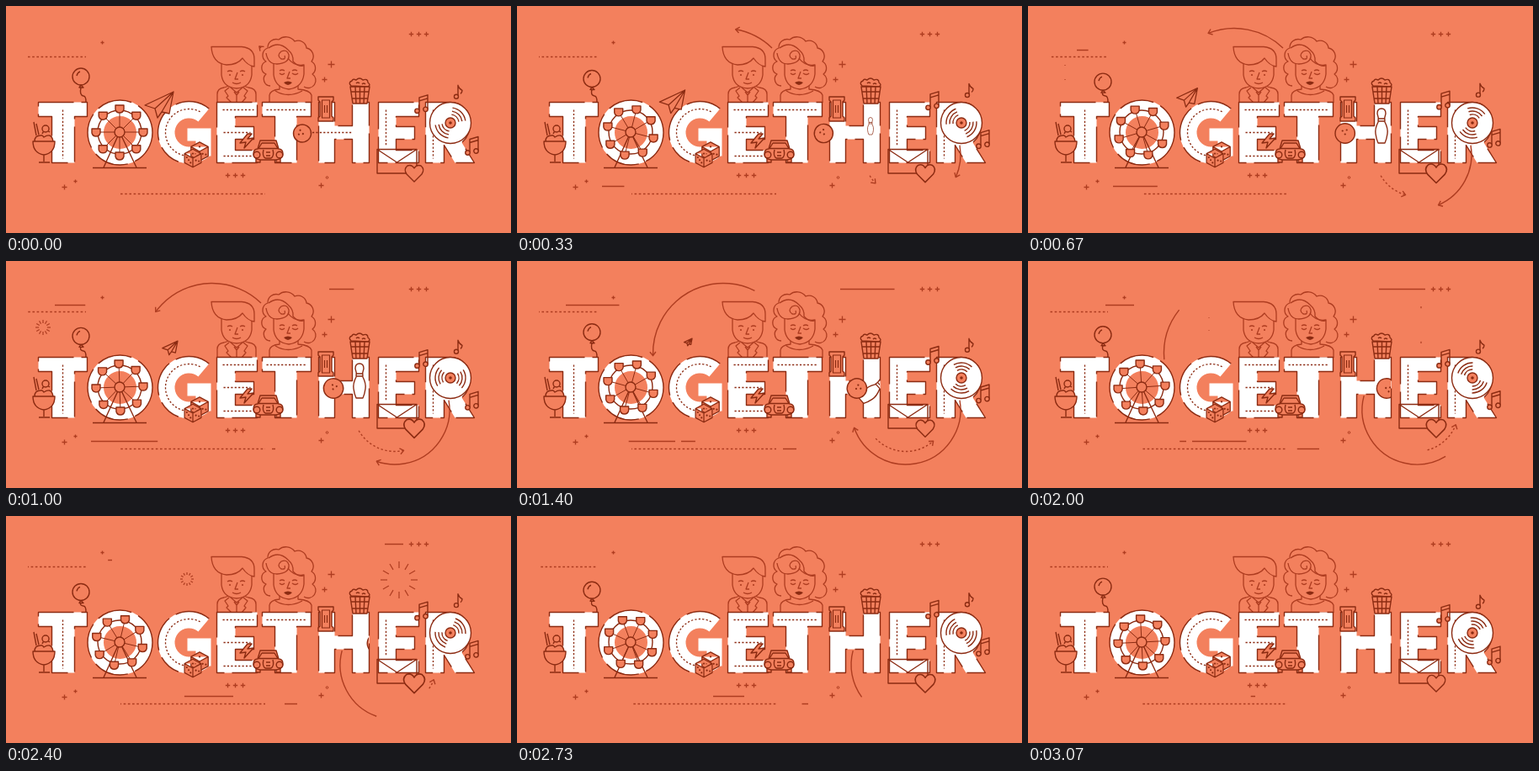
Write an HTML page with a canvas that moves like this. It is 600x270 px and loops after 3.14 s.

```html
<!DOCTYPE html>
<html lang="en">
<head>
<meta charset="utf-8">
<title>Together</title>
<style>
  html, body { margin: 0; width: 100%; height: 100%; overflow: hidden; background: #f3805d; }
  canvas { display: block; width: 600px; height: 270px; }
</style>
</head>
<body>
<canvas id="stage"></canvas>
<script>
const LOOP = 3140, STEPS = 47, TAU = Math.PI * 2, RAD = Math.PI / 180;
const BG = '#f3805d', DARK = '#8c2b12', MID = '#ae3c20', WHITE = '#fff';
const canvas = document.getElementById('stage');
const ctx = canvas.getContext('2d');
const dpr = window.devicePixelRatio || 1;
canvas.width = 600 * dpr;
canvas.height = 270 * dpr;

// Progress 0..1 between two steps, and a straight move over that span.
const progress = (k, from, to) => Math.min(1, Math.max(0, (k - from) / (to - from)));
const move = (k, from, to, a, b) => a + (b - a) * progress(k, from, to);
const easeOut = (p, power) => 1 - (1 - p) ** power;

function paint(path, { fill, line, w = 1.4, dash = [], shift = 0 }) {
  const p = typeof path === 'string' ? new Path2D(path) : path;
  if (fill) { ctx.fillStyle = fill; ctx.fill(p); }
  if (line) {
    ctx.strokeStyle = line;
    ctx.lineWidth = w;
    ctx.setLineDash(dash);
    ctx.lineDashOffset = shift;
    ctx.stroke(p);
  }
}

function arc(x, y, r, from, to, style) {
  const p = new Path2D();
  p.arc(x, y, r, from * RAD, to * RAD, to < from);
  paint(p, style);
}

const disc = (x, y, r, style) => arc(x, y, r, 0, 360, style);

function at(x, y, turn, scale, draw) {
  ctx.save();
  ctx.translate(x, y);
  ctx.rotate(turn * RAD);
  ctx.scale(scale, scale);
  draw();
  ctx.restore();
}

const ink = { line: DARK };
const solid = { line: DARK, fill: BG };
const soft = { line: MID, w: 1.3 };
const softFill = { ...soft, fill: BG };
const dots = { line: DARK, w: 1.3, dash: [2.2, 2.2] };
const edge = { line: DARK, dash: [42, 9] };

const rule = (x0, x1, y) => {
  if (x1 - x0 > 0.5) paint(`M${x0} ${y}H${x1}`, { line: MID, w: 1.5 });
};
const plus = (x, y, r) => paint(`M${x - r} ${y}H${x + r}M${x} ${y - r}V${y + r}`, soft);

function arrow(cx, cy, r, from, to, { dash = [], head = true } = {}) {
  if (Math.abs(to - from) < 1) return;
  arc(cx, cy, r, from, to, { line: MID, dash });
  if (head) at(cx + r * Math.cos(to * RAD), cy + r * Math.sin(to * RAD), to + (to < from ? -90 : 90), 1,
    () => paint('M-4.5 -3.5L0 0L-4.5 3.5', { line: MID }));
}

function burst(x, y, r, k, start) {
  const p = (k - start) / 11;
  if (p <= 0 || p >= 1) return;
  const rays = p < 0.15 ? 2 : 12;
  const inner = r * (rays === 2 ? 0.9 : Math.max(0.5, p));
  for (let i = 0; i < rays; i++)
    at(x, y, 90 + i * 360 / rays, 1, () => paint(`M${inner} 0H${r}`, { line: MID, w: 1.2 }));
}

function face(x, y) {
  paint(`M${x - 11} ${y - 4}q3 -2 6 0m9 0q3 -2 6 0M${x + 1} ${y - 3}l-3 8h4`, soft);
}

function people() {
  // man
  paint('M251 115V105Q251 98 259 97L265 95M297 115V105Q297 98 288 97L282 95M251 115H297', soft);
  paint('M265 97L260 101L264 107L262 109L268 115M282 97L287 101L283 107L285 109L280 115M267 97L274 103L281 97M271 102L274 106L277 102M274 106V115', soft);
  paint('M256 68V82Q258 97 274 98Q290 97 292 82V66', softFill);
  paint('M244 48.5H280Q295 50 295 63V72Q287 71 281 62Q275 70 262 70Q245 68 244 48.5Z', softFill);
  face(274, 82);
  paint('M269 91Q274 94 279 91', soft);
  for (const x of [266, 281]) disc(x, 82, 1.1, { fill: MID });
  // woman
  paint('M314 95A8 8 0 0 1 309 81A8 8 0 0 1 309 66A9 9 0 0 1 311 50A10 10 0 0 1 324 40A13 13 0 0 1 343 42A10 10 0 0 1 357 50A10 10 0 0 1 363 66A9 9 0 0 1 364 81A8 8 0 0 1 354 96', softFill);
  paint('M313 115V106Q314 100 325 99V95M363 115V106Q361 100 347 99V95M313 115H363M320 101Q335 110 352 101', softFill);
  paint('M318 68V82Q320 97 336 99Q352 97 354 81V70Q342 72 335 62', softFill);
  paint('M309 56Q311 69 322 69Q337 68 336 58Q334 51 327 54Q321 59 327 63Q333 64 331 59M312 50Q324 41 335 52Q342 58 341 66Q348 73 354 71', soft);
  face(336, 81);
  paint('M325 80Q328 83 331 80M340 80Q344 83 347 80', soft);
  paint('M330 91Q335 88 340 91Q335 97 330 91Z', { fill: DARK });
}

const LETTERS = [
  'M38 114H96V131H81V186H54V131H38Z',
  'M250 114H298V131H272V143H294V158H272V171H298V186H250Z',
  'M304 114H362V131H345V186H319V131H304Z',
  'M371 114H390V142H411V114H431V186H411V158H390V186H371Z',
  'M442 114H490V131H463V143H485V158H463V171H490V186H442Z',
  'M498 114H526Q550 115 551 138Q551 154 541 162L556 186H533L520 165V186H498Z'
];

function letters() {
  at(0.5, 0.5, 0, 1, () => {
    for (const d of LETTERS) paint(d, { ...edge, fill: WHITE });
    disc(135, 150, 29, { line: WHITE, w: 19 });
    disc(135, 150, 38.5, edge);
    arc(217, 150, 27, -50, -312, { line: WHITE, w: 20 });
    arc(217, 150, 37, -50, -250, edge);
    paint('M215 145H243V178H225V160H215Z', { fill: WHITE });
    paint('M67 123V181M257 123H294M258 150H290M258 178H293M309 123H357M451 123V166M507 123V181', dots);
    arc(217, 150, 28, -62, -258, dots);
  });
}

function wheel(turn) {
  paint('M103 192.5H167M135 150L116 192M135 150L155 192', ink);
  disc(135, 150, 26, ink);
  for (let i = 0; i < 8; i++) {
    const a = (turn + i * 45 - 90) * RAD, c = Math.cos(a), s = Math.sin(a);
    paint(`M135 150L${135 + 27 * c} ${150 + 27 * s}`, { line: DARK, w: 1 });
    at(135 + 28 * c, 150 + 28 * s, 0, 1,
      () => paint('M-5 -4H5V1Q4 5 0 5Q-4 5 -5 1Z', solid));
  }
  disc(135, 150, 6, solid);
}

function cube(x, y, s) {
  at(x, y, 0, s, () => {
    paint('M0 -12L11 -6V6L0 12L-11 6V-6ZM-11 -6L0 0L11 -6M0 0V12', solid);
    for (const [px, py] of [[0, -6], [-8, -1], [-3, 6], [-5.5, 2.5], [4, 3], [8, 4]])
      disc(px, py, 1.2, { fill: DARK });
  });
}

function props(rise) {
  // balloon
  at(89, 85 + rise, 0, 1, () => {
    disc(0, -1, 10, ink);
    paint('M0 9L-2 12H3ZM-5 -2Q-4 -6 -1 -7', ink);
  });
  paint(`M89 ${97 + rise}Q87 106 92 107Q95 107 95 114`, ink);
  // sundae
  paint('M32 161Q32 175 45 177Q58 175 58 161ZM45 177V185M39 186H52M34 161Q34 154 41 154Q43 153 45 156Q54 150 56 161M43 152Q46 145 52 150M36 154L33 138M39 153L36 140', solid);
  disc(47, 146, 4, solid);
  // dice, bolt
  cube(230, 173, 0.93);
  cube(222, 181, 0.9);
  paint('M287 152L278 163L285 162L283 169L294 157L287 158L292 152Z', solid);
  // car
  paint('M297 181V186H302V181ZM321 181V186H326V181Z', solid);
  paint('M294 176Q294 170 299 170L302 160H321L324 170Q329 170 329 176Q329 182 321 183H302Q294 182 294 176Z', solid);
  paint('M300 169.5L304 163H319L323 169.5ZM306 171Q304 178 308 181H315Q319 178 317 171M309 174H314M309 178H314', ink);
  for (const x of [298, 325]) disc(x, 177, 3.8, solid);
  // ticket
  paint('M371 108H389V112L387 114V131L389 133V137H371V133L373 131V114L371 112Z', solid);
  paint('M375.5 112H384.5V133H375.5ZM378.5 118V127M381.5 118V127', { line: DARK, w: 1.2 });
  // popcorn
  paint('M410 95Q406 91 411 89Q412 86 416 88Q420 84 424 88Q430 86 430 91Q434 94 430 96ZM416 92Q418 90 420 92M423 93Q425 91 427 93', solid);
  paint('M409 96H432L429 116H412ZM410 102H431M411 110H430M415 96L416 116M420.5 96V116M426 96L425 116', solid);
}

const PIN = 'M0 -21Q5 -21 5 -15Q3 -10 4 -5Q8 3 7 9Q6 16 4 20H-4Q-6 16 -7 9Q-8 3 -4 -5Q-3 -10 -5 -15Q-5 -21 0 -21ZM-4 -9H4M-4 -6H4';

function bowling(k) {
  const x = 352 + 2.47 * k;
  if (k < 5) paint(`M${x + 12} 150.5H411`, dots);
  ctx.save();
  ctx.beginPath();
  ctx.rect(330, 100, 101, 100);
  ctx.clip();
  if (k < 26) {
    const fall = easeOut(progress(k, 20, 26), 3);
    at(420 + 10 * fall, 143 + 24 * fall, 115 * fall, progress(k, 3, 7), () => paint(PIN, { ...ink, fill: WHITE }));
  }
  at(x, 151.5, (k - 10) * 6, 1, () => {
    disc(0, 0, move(k, 0, 10, 10.5, 11.7), solid);
    for (const [px, py] of [[-3, -3], [2, -4], [0, 1]]) disc(px, py, 1.1, { fill: DARK });
  });
  ctx.restore();
}

function record(turn) {
  disc(528, 139, 24.5, { ...ink, fill: WHITE });
  at(528, 139, turn, 1, () => {
    for (const r of [10, 14, 18]) for (const a of [0, 180]) arc(0, 0, r, a - 37, a + 37, ink);
  });
  disc(528, 139, 6, solid);
  disc(528, 139, 1.8, { fill: DARK });
}

function pair(x, y) {
  at(x, y, 0, 1, () => {
    paint('M-3 8V-8L7 -11V6M-3 -4L7 -7', ink);
    for (const [px, py] of [[-5.5, 8], [4.5, 6]]) disc(px, py, 2.7, solid);
  });
}

function notes(bob) {
  pair(494, 114 + 2.8 * bob);
  pair(554, 161 + 5.5 * bob);
  at(537, 101 + 1.3 * bob, 0, 1, () => {
    paint('M0 6V-8Q1 -4 5 -2Q5 1 3 2', ink);
    disc(-2, 5.5, 2.5, solid);
  });
}

function mail(beat) {
  paint('M441 170.5H488V199H441ZL464.5 186L488 170.5', ink);
  at(485, 199, 0, 1 + 0.16 * beat, () =>
    paint('M0 10L-9 1Q-13 -5 -8 -9Q-3 -11 0 -6Q3 -11 8 -9Q13 -5 9 1Z', solid));
}

function plane(k) {
  const p = progress(k, 0, 27), size = 1 - p ** 1.3;
  if (size <= 0) return;
  at(183 + 30 * p ** 1.5, 117 - 28 * p ** 1.2, 0, size, () =>
    paint('M16 -15L-18 1L-6 5L-3 16L2 9L11 11ZM16 -15L-6 5M16 -15L2 9', { ...solid, w: 1.3 / size }));
}

function lines(k, part) {
  const march = { line: MID, w: 1.4, dash: [2.6, 2.6], shift: part * 3 * 5.2 };
  paint('M26 60.5H95M136 223.5H308', march);
  rule(move(k, 23, 37, 58, 126), move(k, 7, 22, 58, 126), 52.5);
  rule(move(k, 24, 40, 384, 472), move(k, 10, 25, 384, 472), 33.5);
  rule(move(k, 28, 44, 316, 346), move(k, 13, 28, 316, 346), 223.5);
  const tail = move(k, 15, 47, 101, 270), head = move(k, 0, 32, 101, 270);
  rule(tail, Math.min(head, 188), 214.5);
  rule(Math.max(tail, 195), head, 214.5);

  for (const [x, y, r] of [[69, 215, 3], [82, 208, 2], [114, 43, 2], [386, 69, 4], [378, 87, 3], [374, 213, 3]])
    plus(x + 0.5, y + 0.5, r);
  for (let i = 0; i < 3; i++) {
    plus(263.5 + 9 * i, 201.5, 2.7);
    plus(481.5 + 9 * i, 33.5, 2.7);
  }
  disc(381.5, 204, 1.3, { line: MID, w: 1 });
}

function render(now) {
  const k = Math.min(STEPS - 1, Math.floor((now % LOOP) / LOOP * STEPS + 0.1));
  const part = k / STEPS;
  const bob = Math.cos(TAU * 3 * part);
  const swell = (1 - Math.cos(TAU * 2 * part)) / 2;

  ctx.setTransform(dpr, 0, 0, dpr, 0, 0);
  ctx.fillStyle = BG;
  ctx.fillRect(0, 0, 600, 270);
  ctx.lineJoin = 'round';

  lines(k, part);
  burst(44, 79, 9, k, 9);
  burst(215, 75, 8, k, 29);
  burst(467, 76, 22, k, 29);
  arrow(245, 110, 83.5, move(k, 19, 35, -46, -185), move(k, 0, 21.5, -48, -185), { head: k < 24 });
  people();
  letters();
  arrow(462, 177, 65, move(k, 22, 46, -10, 195), move(k, 1, 25, -10, 195), { head: k < 25 });
  arrow(462, 177, 49.5, move(k, 19, 38, 150, 21), 150 - 129 * easeOut(progress(k, 3, 30), 1.4), { dash: [2.4, 2.6] });
  wheel(part * 135);
  plane(k);
  bowling(k);
  props(swell * 6.5);
  record(-45 + part * 720);
  notes(bob);
  mail(swell);
}

function tick(now) {
  render(now);
  requestAnimationFrame(tick);
}
render(0);
requestAnimationFrame(tick);
</script>
</body>
</html>
```
